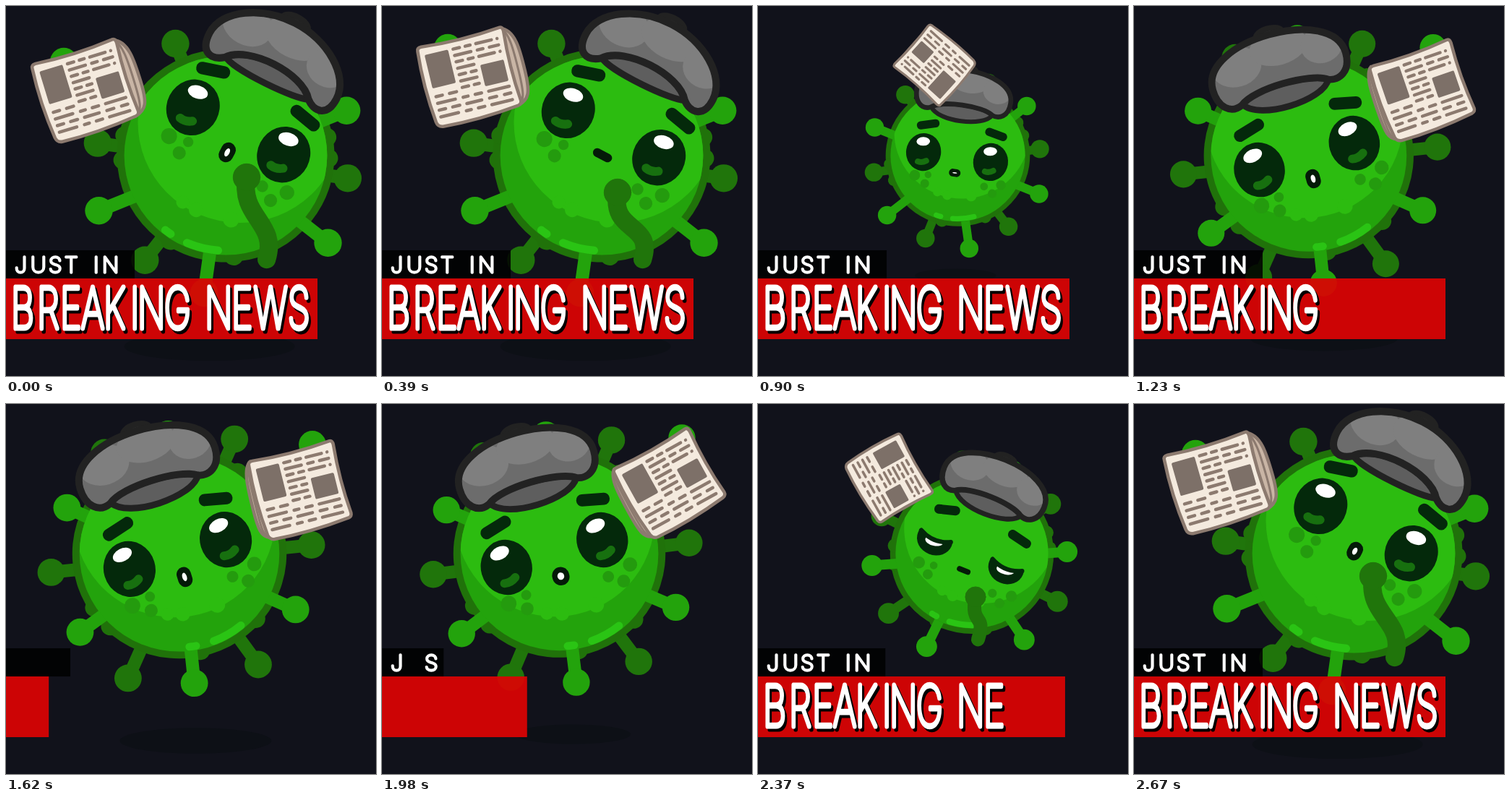
Write an HTML page that moves like this. It is 512x512 px and loops after 2700 ms.

```html
<!DOCTYPE html>
<html lang="en">
<head>
<meta charset="utf-8">
<title>Breaking news</title>
<style>
html, body { margin: 0; width: 100%; height: 100%; overflow: hidden; background: #11121b; }
svg { display: block; width: 100vw; height: 100vh; }
text { font-family: Inter, Lato, sans-serif; font-weight: 100; stroke-linejoin: round; stroke-linecap: round; }
#head text { vector-effect: non-scaling-stroke; stroke-width: 6px; font-size: 78px; }
#sub { font-size: 30px; fill: #fff; stroke: #fff; stroke-width: 3.5px; }
</style>
</head>
<body>
<svg viewBox="0 0 512 512" xmlns="http://www.w3.org/2000/svg">
  <defs>
    <clipPath id="inner"><circle r="139"/></clipPath>
    <clipPath id="lidClip"><path id="lidShape"/></clipPath>
    <clipPath id="hatClip"><path id="hatShape"/></clipPath>
  </defs>
  <rect width="512" height="512" fill="#11121b"/>
  <ellipse id="shadow" fill="#0d1016"/>
  <g id="darkSpikes" stroke="#20750b" fill="#20750b"></g>
  <g id="rim" fill="#20720a"><circle r="149"/></g>
  <g id="brightSpikes" stroke="#23a30c" fill="#23a30c"></g>
  <g id="body">
    <circle r="139" fill="#23a30c"/>
    <g clip-path="url(#inner)"><g id="glow" fill="#2cbc10"><circle cy="-50" r="140"/></g></g>
    <g id="shine" fill="none" stroke="#2ac414" stroke-width="11" stroke-linecap="round"></g>
  </g>
  <g id="face">
    <g id="spots" fill="#249b0e"></g>
    <g id="eyes"></g>
    <g fill="#04290b">
      <rect x="-23.500" y="-8.500" width="47" height="17" rx="8" transform="translate(-69 -58) rotate(-16)"/>
      <rect x="-23.500" y="-8.500" width="47" height="17" rx="8" transform="translate(73 -58) rotate(12)"/>
    </g>
    <rect id="mouth" fill="#041a08"/>
    <ellipse id="teeth" cy="33" fill="#fff"/>
    <g id="hat" stroke-linejoin="round">
      <ellipse cy="-54" rx="19" ry="9" fill="#3a3a3a" stroke="#222" stroke-width="8"/>
      <path id="visor" fill="#5e5e5e" stroke="#222" stroke-width="9"/>
      <path id="cap" fill="#6c6c6c"/>
      <g clip-path="url(#hatClip)" fill="#7f7f7f">
        <ellipse cx="-57" cy="-22" rx="36" ry="28"/>
        <ellipse cx="8" cy="-34" rx="42" ry="26"/>
        <ellipse cx="68" cy="-20" rx="30" ry="26"/>
      </g>
      <path id="capLine" fill="none" stroke="#222" stroke-width="10"/>
    </g>
  </g>
  <g id="arm" stroke="#20750b" fill="#20750b" stroke-linecap="round">
    <path id="armLine" fill="none"/><circle id="armTip"/>
  </g>
  <g id="paper" stroke="#8c7a6f" stroke-width="4.500" stroke-linejoin="round" stroke-linecap="round">
    <path id="flap" fill="#c9b5a5"/>
    <path id="fold" fill="none" stroke-width="3"/>
    <path d="M-60-50Q-60-55-54-55Q0-50 57-56Q61-56 61-50Q57 0 62 48Q62 53 57 54Q0 61-50 58Q-57 57-58 50Q-64 0-60-50Z" fill="#f4eade"/>
    <g fill="#7d7068" stroke="none">
      <rect x="-52" y="-43" width="33" height="47" rx="2"/>
      <rect x="19" y="-12" width="33" height="30" rx="2"/>
    </g>
    <path id="lines" fill="none" stroke-width="4.500"/>
  </g>
  <rect id="black" y="338" height="39" fill="#000" opacity=".86"/>
  <rect id="red" y="377" height="84" fill="#dc0404" opacity=".93"/>
  <text id="sub" y="369"></text>
  <g id="head">
    <g transform="translate(3 450) scale(.64 1)"><text fill="#000" stroke="#000"></text></g>
    <g transform="translate(0 446) scale(.64 1)"><text fill="#fff" stroke="#fff"></text></g>
  </g>
</svg>
<script>
const LOOP = 2700;
const $ = id => document.getElementById(id);
const set = (el, attrs) => { for (const k in attrs) el.setAttribute(k, attrs[k]); };
const rad = d => d * Math.PI / 180;
const mix = (a, b, p) => a + (b - a) * p;
const clamp = v => Math.max(0, Math.min(1, v));
const polar = (x, y, r, deg) => [x + r * Math.cos(rad(deg)), y + r * Math.sin(rad(deg))];

// Seven poses; the fourth is held between two of the key times.
const TIMES = [0, 390, 900, 1290, 1620, 1980, 2370, 2670, LOOP];
const POSE = [0, 1, 2, 3, 3, 4, 5, 6, 7];
const TRACKS = {
  x: [304, 304, 276.5, 240, 245.5, 296, 304],
  s: [1.01, 1.01, .67, .995, .985, .76, 1.01],
  tilt: [27.5, 27.5, 8.5, -17, -16, 22, 27.5],
  spin: [8, 8, -8, -6, -7, 26, 8],
  reach: [5, 5, 5, -4, -3, 0, 5],
  faceX: [321.5, 320.5, 275.5, 237.5, 238.5, 294, 321],
  faceY: [173, 177, 209, 208, 207, 207, 174],
  hatY: [-113, -116, -126, -127, -124, -128, -113],
  bend: [1, 1, 0, 0, 0, 0, 1],
  raise: [1, 1, 0, 0, 0, 1, 1],
  armX: [333, 326, 326, 330, 330, 301, 331],
  armY: [237, 258, 290, 330, 330, 267, 238],
  paperX: [109, 120, 245, 406, 397, 181, 114],
  paperY: [117, 98, 82, 119, 110, 102, 109],
  paperRot: [-17, -13.5, 222, 346, 331, 421, 344, 343],
  side: [1, 1, 0, -1, -1, 0, 1],
  left: [1, 1, 0, 0, 0, .3, 1],
  right: [0, 0, 0, 1, 1, 0, 0],
  mouthW: [10, 14, 12, 10, 12, 13, 10],
  mouthH: [14, 6, 8, 14, 13, 5, 13],
  shadowY: [471, 471, 373, 466, 457, 395, 471],
  shadowW: [118, 118, 56, 105, 80, 62, 118]
};

// Monotone cubic through the keys.
function track(v, t) {
  const y = POSE.map(p => v[p] ?? v[0]);
  const slope = i => (y[i + 1] - y[i]) / (TIMES[i + 1] - TIMES[i]);
  const tangent = i => {
    if (i === 0 || i === y.length - 1) return 0;
    const a = slope(i - 1), b = slope(i);
    return a * b <= 0 ? 0 : 2 * a * b / (a + b);
  };
  let i = 0;
  while (i < TIMES.length - 2 && t >= TIMES[i + 1]) i++;
  const h = TIMES[i + 1] - TIMES[i], p = (t - TIMES[i]) / h, q = 1 - p;
  return y[i] * (1 + 2 * p) * q * q + y[i + 1] * p * p * (3 - 2 * p)
    + h * p * q * (tangent(i) * q - tangent(i + 1) * p);
}

// Fixed parts
const circles = list => list.map(([x, y, r]) => `<circle cx="${x}" cy="${y}" r="${r}"/>`).join('');
$('spots').innerHTML = circles([[-81, 50, 11], [-54, 45, 7], [-58, 64, 9], [64, 52, 8], [98, 44, 10], [83, 64, 9]]);
$('rim').innerHTML += circles([-38, -26, 58, 95, 150, 164].map(a => [...polar(0, 0, 141, a), 13]));
$('glow').innerHTML += circles([[72, 11], [93, 10], [102, 9]].map(([a, r]) => [...polar(0, -50, 136, a), r]));
const arc = (a, b) => `<path d="M${polar(0, 0, 133, a)}A133 133 0 0 0 ${polar(0, 0, 133, b)}"/>`;
$('shine').innerHTML = arc(101, 97) + arc(86, 67);
$('eyes').innerHTML = [-70, 70].map(x => `<g transform="translate(${x} 0)">
  <g clip-path="url(#lidClip)"><ellipse class="ball" rx="36" fill="#04290b"/>
  <path class="low" d="M-9 21Q0 23 8 17" stroke="#17700f" stroke-width="12" stroke-linecap="round" fill="none"/>
  <ellipse class="glint" rx="14" ry="9" transform="rotate(-10)" fill="#fff"/></g>
  <path class="lid" fill="none" stroke="#04290b" stroke-width="8" stroke-linecap="round"/></g>`).join('');

const dash = (y, ...spans) => spans.map(([a, b]) => `M${a} ${y}H${b}`).join('');
let print = '';
for (let i = 0; i < 7; i++) print += dash(-42 + i * 9, i % 2 ? [-12, 11] : [-12, -3], i % 2 ? [11, 11] : [5, 12]);
for (let i = 0; i < 3; i++) print += dash(-42 + i * 9, i % 2 ? [20, 28] : [20, 42], i % 2 ? [37, 50] : [50, 50]);
for (let i = 0; i < 4; i++) print += dash(16 + i * 9.5, i % 2 ? [-50, -25] : [-50, -41], i % 2 ? [-14, -7] : [-31, -21]);
for (let i = 1; i < 4; i++) print += dash(16 + i * 9.5, i % 2 ? [3, 12] : [-11, 10], i % 2 ? [22, 50] : [21, 31], [42, 51]);
$('lines').setAttribute('d', print);

function addSpike(parent) {
  const g = document.createElementNS('http://www.w3.org/2000/svg', 'g');
  g.innerHTML = '<line/><circle stroke="none"/>';
  parent.append(g);
  return g;
}
const spikes = Array.from({ length: 12 }, (_, i) => addSpike($(i % 2 ? 'darkSpikes' : 'brightSpikes')));

const HEAD = 'BREAKING NEWS', SUB = 'JUST IN';
const headX = [7, 43, 75, 104, 135, 172, 182, 219, 260, 275, 312, 343, 390];
const headText = document.querySelectorAll('#head text');
headText.forEach(el => el.setAttribute('x', headX.map(x => (x / .64).toFixed(1)).join(' ')));
$('sub').setAttribute('x', '12 34 59 81 110 121 133');
$('sub').innerHTML = [...SUB].map(c => `<tspan>${c}</tspan>`).join('');
const subOrder = [0, 3, 1, 5, 2, 6, 4];

function drawSpikes(k) {
  const cx = k.x - k.tilt * .15, cy = 214;
  spikes.forEach((g, i) => {
    const angle = 90 + k.spin + i * 30;
    const len = (178 + (i % 2 ? -1 : 1) * k.reach) * k.s;
    const [x1, y1] = polar(cx, cy, 126 * k.s, angle);
    let [x2, y2] = polar(cx, cy, len, angle);
    const hold = i === 4 ? k.left : i === 8 ? k.right : 0;
    x2 = mix(x2, k.paperX + (i === 4 ? -29 : 18), hold);
    y2 = mix(y2, k.paperY + (i === 4 ? -40 : -63), hold);
    set(g.children[0], { x1, y1, x2, y2, 'stroke-width': 18 * k.s });
    set(g.children[1], { cx: x2, cy: y2, r: 19 * k.s });
    if (i !== 11) return;
    // This one can bend up in front of the face.
    const up = k.raise > .02;
    g.style.display = up ? 'none' : '';
    $('arm').style.display = up ? '' : 'none';
    const [bx, by] = polar(cx, cy, mix(140, 148, k.raise) * k.s, angle - 2 * k.raise);
    const tx = mix(x2, k.armX, k.raise), ty = mix(y2, k.armY, k.raise), r = k.raise * k.s;
    set($('armLine'), {
      d: `M${bx} ${by}C${bx + 16 * r} ${by - 50 * r} ${tx - 10 * r} ${ty + 55 * r} ${tx} ${ty}`,
      'stroke-width': mix(18, 25, k.raise) * k.s
    });
    set($('armTip'), { cx: tx, cy: ty, r: 18.5 * k.s });
  });
}

function drawFace(k, t) {
  set($('face'), { transform: `translate(${k.faceX} ${k.faceY}) rotate(${k.tilt}) scale(${k.s})` });
  const shut = clamp((t - 2250) / 90) * clamp((2500 - t) / 100);
  const lid = mix(-46, -3, shut), sag = 7 * shut;
  const curve = `M-29 ${lid - 3}Q0 ${lid + sag + 5} 29 ${lid - 3}`;
  set($('lidShape'), { d: curve + 'L45 -3V50H-45V-3Z' });
  const each = (name, attrs) => document.querySelectorAll('.' + name).forEach(el => set(el, attrs));
  each('ball', { ry: mix(39, 29, shut), rx: mix(36, 33, shut) });
  each('glint', { cy: mix(-22, 3, shut), rx: mix(14, 17, shut) });
  each('low', { opacity: 1 - shut });
  each('lid', { d: curve, opacity: shut > .3 ? 1 : 0 });

  const w = k.mouthW, h = k.mouthH;
  set($('mouth'), { x: -w, y: 33 - h, width: 2 * w, height: 2 * h, rx: Math.min(w, h) });
  set($('teeth'), { rx: Math.max(0, (w - 6) * .8), ry: Math.max(0, (h - 6.5) * .8) });

  const b = k.bend, y = 12 * b;
  const cap = `M-98 ${y}C-98 ${-36 + y} -50 -54 0 -54S98 ${-36 + y} 98 ${y}C98 ${28 + y} 78 ${36 + y / 2} 64 30`
    + `C42 ${14 - y} -42 ${14 - y} -64 32C-82 ${40 + y / 2} -98 ${26 + y} -98 ${y}Z`;
  for (const id of ['hatShape', 'cap', 'capLine']) set($(id), { d: cap });
  set($('visor'), { d: `M-63 31C-40 ${14 - y} 40 ${14 - y} 64 30C50 ${57 - 18 * b} -46 ${60 - 18 * b} -63 31Z` });
  set($('hat'), { transform: `translate(${mix(-5, 1, b)} ${k.hatY})` });
}

function drawPaper(k) {
  set($('paper'), { transform: `translate(${k.paperX} ${k.paperY}) rotate(${k.paperRot}) scale(${k.s * .9 + .1})` });
  const d = k.side, e = d < 0 ? -1 : 1, w = Math.abs(d) * (d < 0 ? 9 : 17);
  const edge = f => `M${e * 57} -55C${e * (60 + w * f)} -48 ${e * (60 + w * f)} -20 ${e * (60 + w * f)} 10`
    + `S${e * (60 + w * f * .8)} 50 ${e * 56} 54`;
  set($('flap'), { d: edge(1) + 'Z' });
  set($('fold'), { d: edge(.5) });
}

function drawBanner(t) {
  const grow = (start, dur) => 1 - (1 - clamp((t - start) / dur)) ** 3;
  const inOut = p => p < .5 ? 4 * p ** 3 : 1 - 4 * (1 - p) ** 3;
  const shrink = start => 1 - inOut(clamp((t - start) / 400));
  const back = t > 1851;
  $('red').setAttribute('width', 431 * (back ? grow(1851, 684) : shrink(1350)));
  $('black').setAttribute('width', 178 * (back ? grow(1851, 660) : shrink(1420)));
  const typed = back ? Math.floor((t - 2040) / 30 + .01) : Math.ceil((1450 - t) / 25);
  const shown = HEAD.slice(0, Math.max(0, Math.min(13, typed)));
  headText.forEach(el => { el.textContent = shown; });
  const letters = back ? (t - 1920) / 30 : (1420 - t) / 30;
  [...$('sub').children].forEach((el, i) => {
    el.style.visibility = subOrder[i] < letters - .01 ? 'visible' : 'hidden';
  });
}

function draw(t) {
  const k = {};
  for (const name in TRACKS) k[name] = track(TRACKS[name], t);
  const wave = t < 390 ? Math.sin(2 * Math.PI * t / 390)
    : t > 1260 && t < 1980 ? Math.sin(2 * Math.PI * (t - 1260) / 360) : 0;
  k.paperY += 9 * wave;
  k.paperRot -= 5 * wave;
  set($('shadow'), { cx: mix(k.x, 272, .7), cy: k.shadowY, rx: k.shadowW, ry: k.shadowW * .17 });
  const place = `translate(${k.x} 207) scale(${k.s} ${k.s * .98})`;
  set($('rim'), { transform: `${place} rotate(${k.tilt})` });
  set($('body'), { transform: place });
  set($('glow'), { transform: `rotate(${k.tilt * .7 + 4})` });
  set($('shine'), { transform: `rotate(${k.tilt})` });
  drawSpikes(k);
  drawFace(k, t);
  drawPaper(k);
  drawBanner(t);
}

const start = performance.now();
function tick() {
  const t = (performance.now() - start) % LOOP;
  draw(Math.floor(t / 30) * 30);
  requestAnimationFrame(tick);
}
draw(0);
tick();
</script>
</body>
</html>
```
